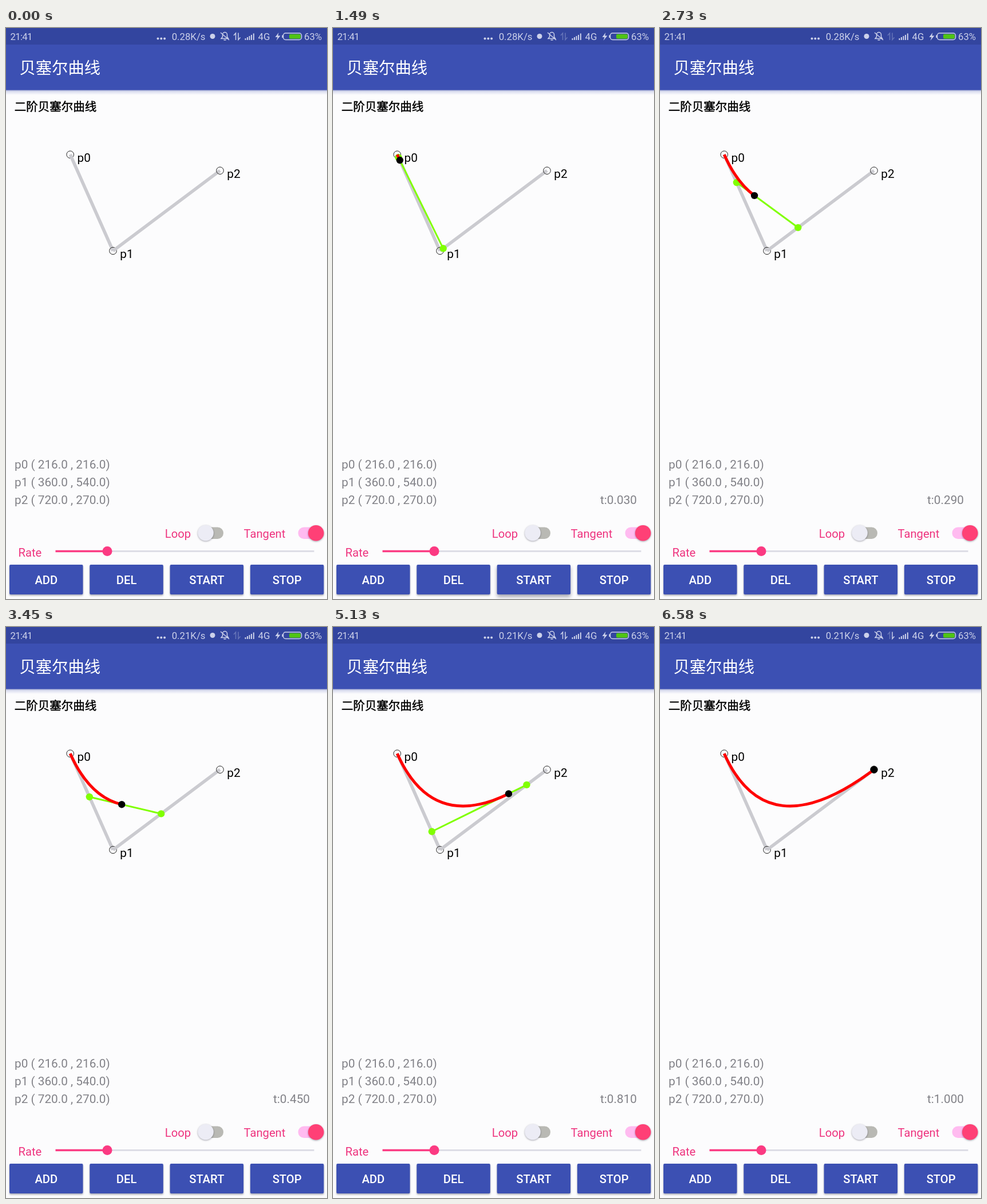
Animation of 561x998 px, one loop 7.16 s. Source, as an HTML page:

```html
<!DOCTYPE html>
<html lang="zh-CN">
<head>
<meta charset="utf-8">
<title>贝塞尔曲线</title>
<style>
  html, body { margin: 0; width: 100%; height: 100%; overflow: hidden; background: #fcfcfd; }
  svg { display: block; width: 100vw; height: 100vh; font-family: Roboto, sans-serif; }
  .cjk { font-family: "Noto Sans CJK SC", "Noto Sans CJK", sans-serif; }
  .status { fill: #ccd1ea; font-size: 16.8px; }
  .icon { fill: none; stroke: #ccd1ea; stroke-width: 1.5; }
  .solid { fill: #ccd1ea; }
  .label { font-size: 20.77px; }
  .info { font-size: 20.77px; fill: #818187; white-space: pre; }
  .pink { font-size: 20.2px; fill: #ee347f; }
  .button { filter: drop-shadow(0 2px 1.5px rgba(0, 0, 30, .33)); }
  .button.down { filter: drop-shadow(0 4px 3px rgba(0, 0, 30, .36)); }
  .button rect { fill: #3c50b3; }
  .button text { fill: #fff; font-size: 20.2px; font-weight: 500; text-anchor: middle; }
  .thumb { filter: drop-shadow(0 1px 1.5px rgba(0, 0, 30, .35)); }
  .bone { stroke: #cbcbd0; stroke-width: 5.6; }
  .ring { fill: none; stroke: #222; stroke-width: 1; }
</style>
</head>
<body>
<svg viewBox="0 0 561 998" preserveAspectRatio="none">
  <defs>
    <linearGradient id="fade" x2="0" y2="1">
      <stop offset="0" stop-color="#9ea5d0"/>
      <stop offset=".35" stop-color="#dcdff0"/>
      <stop offset="1" stop-color="#fcfcfd"/>
    </linearGradient>
  </defs>
  <rect width="561" height="998" fill="#fcfcfd"/>

  <!-- header -->
  <rect y="108" width="561" height="9" fill="url(#fade)"/>
  <rect width="561" height="108.5" fill="#3c50b3"/>
  <rect width="561" height="29" fill="#33459f"/>
  <text class="cjk" x="23.5" y="80.3" font-size="28.3" fill="#fff">贝塞尔曲线</text>

  <!-- status bar -->
  <g class="status">
    <text x="7.5" y="20.8" letter-spacing="-.7">21:41</text>
    <text id="speed" x="348.5" y="20.8" text-anchor="end"></text>
    <text x="440.5" y="20.8">4G</text>
    <text x="521" y="20.8">63%</text>
    <circle cx="265.5" cy="18.5" r="2"/>
    <circle cx="271.3" cy="18.5" r="2"/>
    <circle cx="277.1" cy="18.5" r="2"/>
    <circle cx="361" cy="14.5" r="4.5"/>
  </g>
  <path class="icon" d="M376 18.5h12.5l-2-3v-4a4 4 0 0 0-8 0v4zM380.5 21h4M375 8l15 13"/>
  <path class="icon" id="up" d="M401.5 21v-12l-3.500 4"/>
  <path class="icon" id="down" d="M406 8.500v12l3.500-4"/>
  <path class="solid" d="M417.500 18h2v3h-2zM421 16h2v5h-2zM424.500 14h2v7h-2zM428 12h2v9h-2zM431.800 9.500h2v11.500h-2z"/>
  <path class="solid" d="M476.500 8l-6 8h4l-2 6 7-8.500h-4.200z"/>
  <rect class="icon" x="484.500" y="9" width="32" height="11.500" rx="4"/>
  <rect class="solid" x="482.300" y="12.500" width="2" height="4.500"/>
  <rect x="495" y="10.800" width="20" height="8" rx="2" fill="#4fc414"/>

  <!-- plot -->
  <text class="cjk" x="14.800" y="145.300" font-size="20.500" stroke="#000" stroke-width=".5">二阶贝塞尔曲线</text>
  <g id="plot"></g>
  <g id="live">
    <g id="tangent" fill="#80ff00" stroke="#80ff00">
      <line id="bar" stroke-width="3"/>
      <circle id="a" r="6.200" stroke="none"/>
      <circle id="b" r="6.200" stroke="none"/>
    </g>
    <path id="curve" fill="none" stroke="#f00" stroke-width="5"/>
    <circle id="dot" r="6.200"/>
    <text class="info" id="clock" x="467" y="832.300"></text>
  </g>
  <g id="list"></g>

  <!-- controls -->
  <text class="pink" x="277.800" y="890.800">Loop</text>
  <rect x="337" y="872.500" width="43" height="20.500" rx="10.200" fill="#b9b9b4"/>
  <circle class="thumb" cx="349" cy="882.500" r="13.800" fill="#ececf5"/>
  <text class="pink" x="415.500" y="890.800">Tangent</text>
  <rect x="510.500" y="872.500" width="43" height="20.500" rx="10.200" fill="#ffbbf0"/>
  <circle class="thumb" cx="541.800" cy="882.800" r="13.800" fill="#ff4076"/>
  <text class="pink" x="21.500" y="924">Rate</text>
  <path d="M177 914.500H538.500" stroke="#dddde6" stroke-width="3"/>
  <path d="M86.500 914.500H177" stroke="#fb3a82" stroke-width="3.500"/>
  <circle cx="177" cy="914.500" r="8.500" fill="#fb3a82"/>
  <g id="buttons"></g>
</svg>
<script>
  const LOOP = 7160, RUN = 1350, DONE = 6000;
  const $ = id => document.getElementById(id);
  const SCALE = 561 / 1080, TOP = 109;
  const raw = [[216, 216], [360, 540], [720, 270]];
  const pts = raw.map(([x, y]) => [x * SCALE, y * SCALE + TOP]);

  function add(parent, tag, attrs, text) {
    const el = document.createElementNS('http://www.w3.org/2000/svg', tag);
    set(el, attrs);
    if (text) el.textContent = text;
    return parent.appendChild(el);
  }
  function set(el, attrs) {
    for (const k in attrs) el.setAttribute(k, attrs[k]);
  }
  const mix = (p, q, t) => [0, 1].map(i => p[i] + (q[i] - p[i]) * t);
  const place = (el, [cx, cy]) => set(el, { cx, cy });

  // Each segment is drawn over the ring it leaves.
  pts.forEach(([x, y], i) => {
    if (i) {
      const [x1, y1] = pts[i - 1];
      add($('plot'), 'line', { class: 'bone', x1, y1, x2: x, y2: y });
    }
    add($('plot'), 'circle', { class: 'ring', cx: x, cy: y, r: 6.3 });
    add($('plot'), 'text', { class: 'label', x: x + 12.3, y: y + 12.3 }, 'p' + i);
    const [u, v] = raw[i].map(n => n.toFixed(1));
    add($('list'), 'text', { class: 'info', x: 15, y: 770 + 31.15 * i }, `p${i} ( ${u} , ${v})`);
  });

  const buttons = ['ADD', 'DEL', 'START', 'STOP'].map((name, i) => {
    const x = 6 + 140.3 * i;
    const g = add($('buttons'), 'g', { class: 'button' });
    add(g, 'rect', { x, y: 938, width: 128.5, height: 52, rx: 2 });
    add(g, 'text', { x: x + 64.3, y: 972 }, name);
    return g;
  });

  // Steps of 0.01 held for 100, 20 and 20 ms in turn.
  function progress(ms) {
    if (ms >= DONE) return 1;
    const e = ms - RUN, r = e % 140;
    return (3 * Math.floor(e / 140) + (r >= 100) + (r >= 120)) / 100;
  }

  function draw(ms) {
    $('speed').textContent = ms < 3270 ? '0.28K/s' : '0.21K/s';
    const busy = ms < 420 || ms >= 4850;
    $('up').style.opacity = busy && ms < 6580 ? 1 : .35;
    $('down').style.opacity = busy ? 1 : .35;
    buttons[2].classList.toggle('down', ms >= 1040 && ms < 1750);

    const on = ms >= RUN;
    $('live').style.display = on ? '' : 'none';
    if (!on) return;
    const t = progress(ms);
    const a = mix(pts[0], pts[1], t), b = mix(pts[1], pts[2], t), c = mix(a, b, t);
    $('tangent').style.display = t < 1 ? '' : 'none';
    set($('bar'), { x1: a[0], y1: a[1], x2: b[0], y2: b[1] });
    place($('a'), a);
    place($('b'), b);
    place($('dot'), c);
    set($('curve'), { d: `M${pts[0]} Q${a} ${c}` });
    $('clock').textContent = 't:' + t.toFixed(3);
  }

  const start = performance.now();
  function tick() {
    draw((performance.now() - start) % LOOP);
    requestAnimationFrame(tick);
  }
  tick();
</script>
</body>
</html>
```
